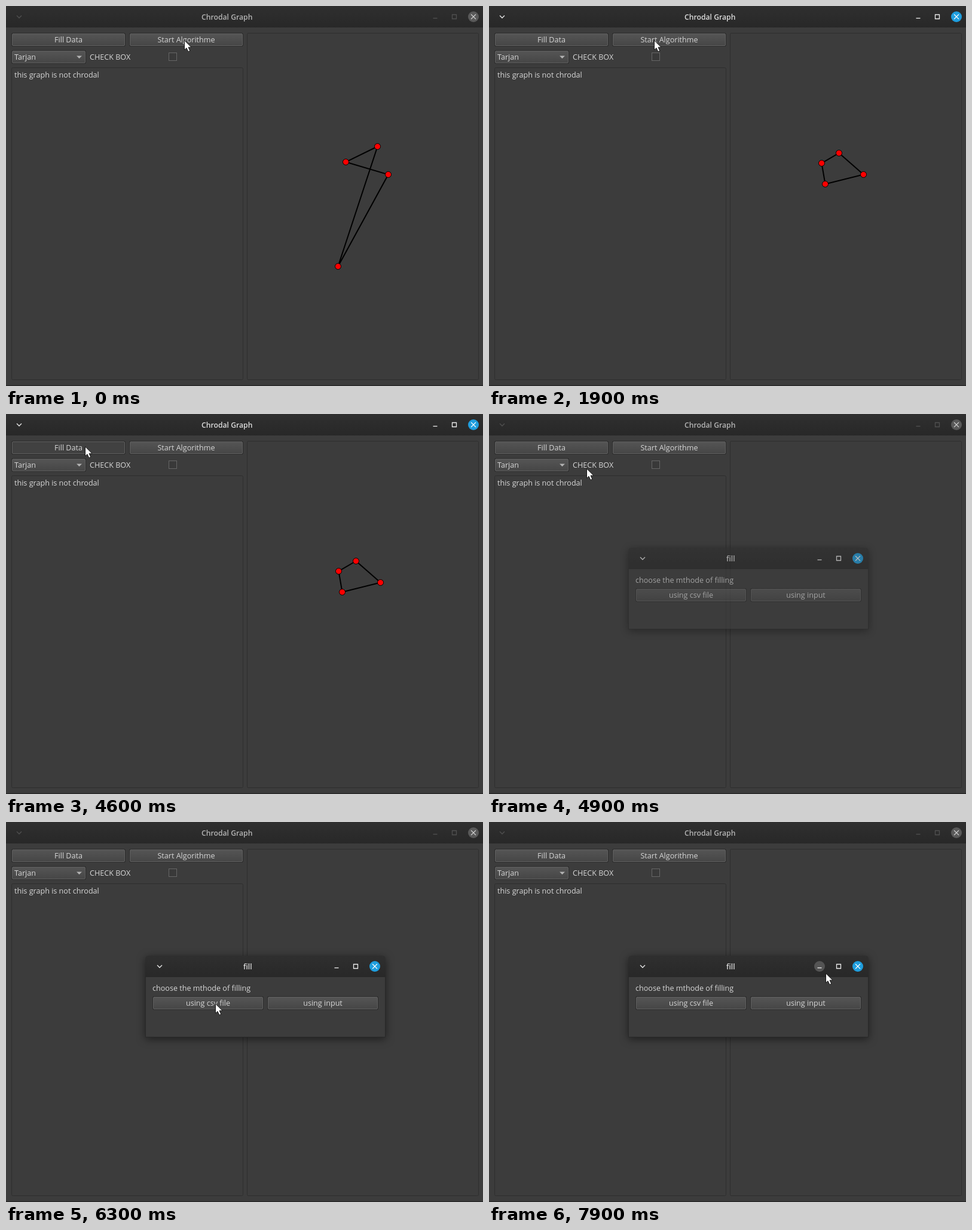
These frames come from a looping animation (798x637 px, 8 s). An HTML page:

```html
<!DOCTYPE html>
<html lang="en">
<head>
<meta charset="utf-8">
<title>Chrodal Graph</title>
<style>
  html, body { margin: 0; width: 100%; height: 100%; overflow: hidden; background: #3c3c3c; }
  svg { display: block; width: 100%; height: 100%; }
  text { font: 12.6px "Open Sans", "Noto Sans", sans-serif; fill: #d6d6d6; }
  .mid { text-anchor: middle; }
  .panel { fill: none; stroke: #2e2e2e; }
  .pressed { fill: #414141; }
  .window { --ink: #ededed; --title: #dcdcdc; --close: #1f9ede; --cross: #fff; }
  .window.inactive { --ink: #505050; --title: #b4b4b4; --close: #595959; --cross: #d0d0d0; }
  .title { fill: var(--title); font-size: 12.2px; font-weight: 600; }
  .icon { fill: none; stroke: var(--ink); stroke-width: 1.3; }
  .close { fill: var(--close); }
  .cross { stroke: var(--cross); stroke-width: 1.1; }
  .edges { fill: none; stroke: #000; stroke-width: 2; }
  .node { fill: #f00; stroke: #000; }
  #dialog { filter: drop-shadow(0 3px 7px rgba(0, 0, 0, .5)); }
</style>
</head>
<body>
<svg id="stage" viewBox="0 0 798 637"></svg>
<script>
const stage = document.getElementById('stage');

const label = (x, y, text, cls = '') => `<text x="${x}" y="${y}" class="${cls}">${text}</text>`;

const box = (x, y, w, h, attrs) =>
  `<rect x="${x}" y="${y}" width="${w}" height="${h}" ${attrs}/>`;

const panel = (x, y, w, h) => box(x + .5, y + .5, w - 1, h - 1, 'class="panel" rx="2"');

// Dark outline with a lighter inner edge.
const bevel = (x, y, w, id = '') =>
  box(x + .5, y + .5, w - 1, 22, 'rx="2" fill="#292929" stroke="#2b2b2b"') +
  box(x + 1.5, y + 1.5, w - 3, 20, `id="${id}" rx="1.5" fill="url(#face)" stroke="#606060"`);

const button = (x, y, w, text, id) => bevel(x, y, w, id) + label(x + w / 2, y + 16, text, 'mid');

// Controls sit 16px inside the bar, 32px apart; the title is centred at titleX.
function titleBar(x, y, w, radius, inset, text, titleX) {
  const cy = y + 18, left = x + inset, closeX = x + w - inset + 6;
  const maximizeX = closeX - 32, minimizeX = closeX - 64;
  return `<path fill="url(#bar)" d="M${x} ${y + 36}v${radius - 36}q0 ${-radius} ${radius} ${-radius}
      h${w - 2 * radius}q${radius} 0 ${radius} ${radius}v${36 - radius}z"/>
    <path class="icon" d="M${left - 4} ${cy - 2}l4 4 4-4"/>
    ${label(titleX, cy + 5, text, 'title mid')}
    <circle class="hover" cx="${minimizeX}" cy="${cy}" r="9" fill="#545454" visibility="hidden"/>
    <path class="icon" d="M${minimizeX - 3.5} ${cy + 2.5}h7"/>
    <path class="icon" d="M${maximizeX - 3.5} ${cy - 3.5}h7v7h-7z"/>
    <circle class="close" cx="${closeX}" cy="${cy}" r="9"/>
    <path class="cross" d="M${closeX - 4} ${cy - 4}l8 8m0-8l-8 8"/>`;
}

const graph = (id, points) =>
  `<g id="${id}"><path class="edges" d="M${points.join('L')}z"/>` +
  points.map(([x, y]) => `<circle class="node" cx="${x}" cy="${y}" r="5"/>`).join('') + '</g>';

stage.innerHTML = `
  <defs>
    <linearGradient id="face" x2="0" y2="1"><stop stop-color="#555"/><stop offset="1" stop-color="#464646"/></linearGradient>
    <linearGradient id="bar" x2="0" y2="1"><stop stop-color="#2f2f2f"/><stop offset="1" stop-color="#282828"/></linearGradient>
  </defs>
  ${box(0, 0, 798, 637, 'fill="#3c3c3c"')}
  <g id="main" class="window">
    ${titleBar(0, 0, 798, 2, 22, 'Chrodal Graph', 369.7)}
    ${box(0, 635.5, 798, 1.5, 'fill="#292929"')}
    ${button(9, 45, 191, 'Fill Data', 'fillButton')}
    ${button(206, 45, 191, 'Start Algorithme')}
    ${bevel(9, 74, 125)}
    ${label(14, 90, 'Tarjan')}
    <path d="M118 83.5h9l-4.5 4.5z" fill="#b4b4b4"/>
    ${label(140, 90, 'CHECK BOX')}
    ${box(272.5, 78.5, 13, 13, 'fill="#393939" stroke="#666"')}
    ${panel(9, 103, 388, 524)}
    ${label(14, 120, 'this graph is not chrodal')}
    ${panel(403, 45, 388, 582)}
    ${graph('crossed', [[621.5, 235.5], [568.5, 261.5], [639.5, 282.5], [555.5, 436.5]])}
    ${graph('cycle', [[585.5, 246.5], [556.5, 263.5], [562.5, 298.5], [626.5, 282.5]])}
  </g>
  <g id="dialog" class="window">
    <path d="M233 258h402v103h-402z" fill="#292929"/>
    ${box(234, 259, 400, 101, 'fill="#3c3c3c"')}
    ${titleBar(233, 224, 402, 6, 24, 'fill', 404.3)}
    ${label(245, 283, 'choose the mthode of filling')}
    ${button(245, 292, 186, 'using csv file')}
    ${button(437, 292, 186, 'using input')}
  </g>
  <path id="pointer" d="M.5-.2V15.7L4 12.4 6.8 18.5 9.8 17.2 7.1 11.2H12z" fill="#fff" stroke="#151515"/>`;

const [main, dialog, crossed, cycle, fillButton, pointer] =
  ['main', 'dialog', 'crossed', 'cycle', 'fillButton', 'pointer'].map(id => document.getElementById(id));
const minimizeHover = dialog.querySelector('.hover');

// Each stroke carries the pointer on to x, y; sag bows it downwards on the way.
const start = { x: 298, y: 58 };
const strokes = [
  { from: 1800, to: 2500, x: 146, y: 58, sag: 0 },
  { from: 3400, to: 3500, x: 155, y: 65, sag: 0 },
  { from: 3500, to: 3600, x: 135, y: 66, sag: 0 },
  { from: 3700, to: 4400, x: 132, y: 55, sag: 18 },
  { from: 4700, to: 5400, x: 242, y: 185, sag: 0 },
  { from: 5400, to: 6300, x: 350, y: 305, sag: 28 },
  { from: 6400, to: 7000, x: 453, y: 283, sag: 0 },
  { from: 7000, to: 7900, x: 563, y: 254, sag: 58 }
];

const progress = (t, from, to) => Math.min(1, Math.max(0, (t - from) / (to - from)));

function pointerAt(t) {
  let { x, y } = start;
  for (const stroke of strokes) {
    const k = progress(t, stroke.from, stroke.to);
    x += (stroke.x - x) * k;
    y += (stroke.y - y) * k + stroke.sag * Math.sin(Math.PI * k);
  }
  return [Math.round(x), Math.round(y)];
}

const show = (element, visible) => element.setAttribute('visibility', visible ? 'visible' : 'hidden');

function draw(now) {
  const t = Math.floor(now % 8000 / 100) * 100; // the screen refreshes ten times a second
  const opacity = progress(t, 4700, 5000);
  main.classList.toggle('inactive', t < 1000 || t >= 4800);
  show(crossed, t < 1100);
  show(cycle, t >= 1100 && t < 4800);
  fillButton.classList.toggle('pressed', t >= 4600 && t < 4700);
  show(dialog, opacity > 0);
  dialog.style.opacity = opacity;
  show(minimizeHover, t >= 7900);
  pointer.setAttribute('transform', `translate(${pointerAt(t)})`);
  requestAnimationFrame(draw);
}
requestAnimationFrame(draw);
</script>
</body>
</html>
```
